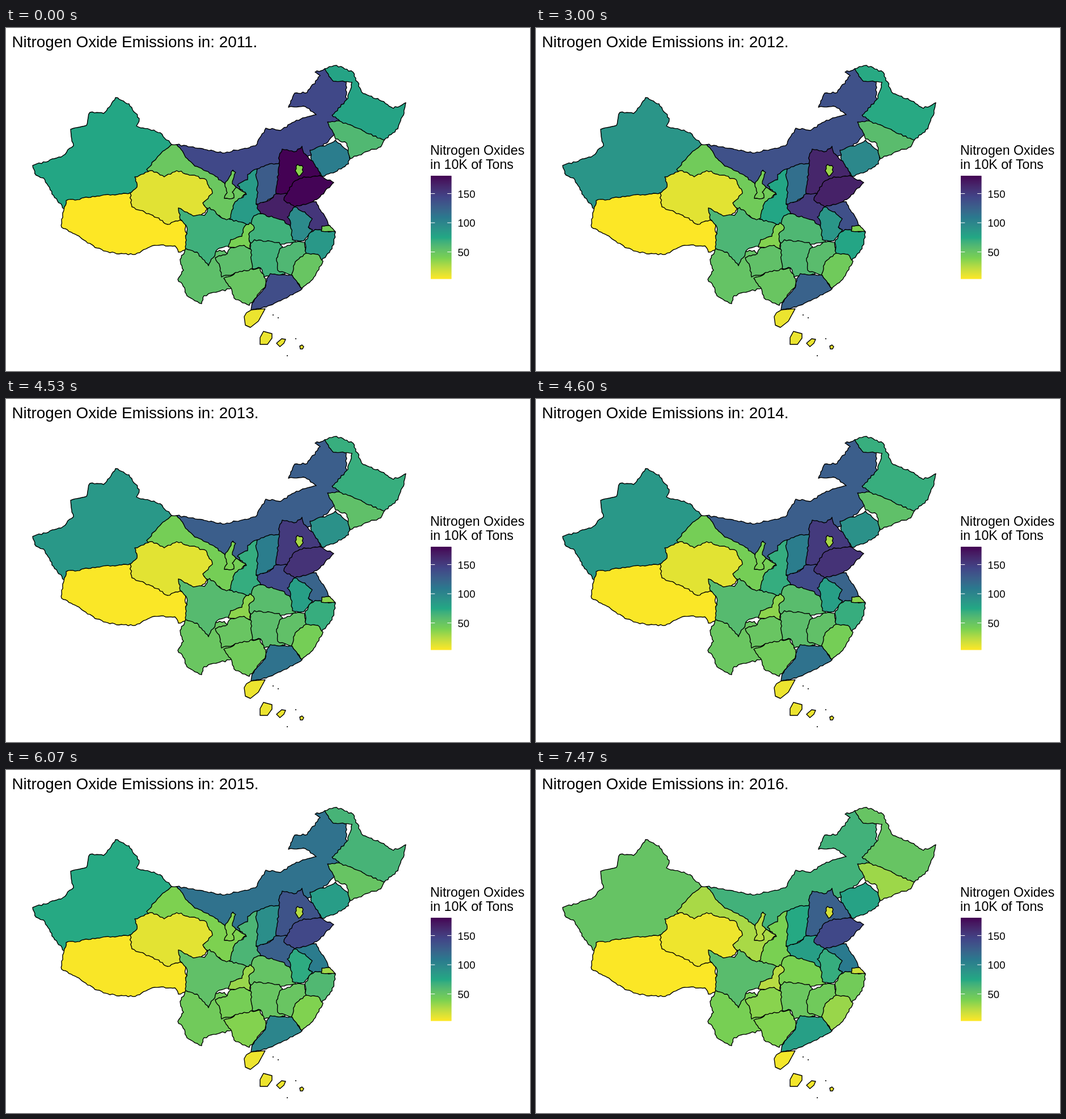
An HTML page with a canvas that plays this animation: 924 by 606 pixels, repeating every 8 s.

```html
<!DOCTYPE html>
<html lang="en">
<head>
<meta charset="utf-8">
<title>Nitrogen Oxide Emissions</title>
<style>
html, body { margin: 0; width: 100%; height: 100%; overflow: hidden; background: #fff; }
canvas { display: block; width: 924px; height: 606px; }
</style>
</head>
<body>
<canvas id="c" width="924" height="606"></canvas>
<script>
const ctx = document.getElementById('c').getContext('2d');
const LOOP = 8000, LOW = 4.1, HIGH = 180.11;
const FILL_AT = [1470, 3000, 4530, 6000, 7400];
const YEAR_AT = [1530, 3070, 4600, 6070, 7470];

// Colour scale, blended in Lab space
const lin = c => c <= .04045 ? c / 12.92 : ((c + .055) / 1.055) ** 2.4;
const gam = c => c <= .0031308 ? c * 12.92 : 1.055 * c ** (1 / 2.4) - .055;

function toLab(hex) {
  const [r, g, b] = [0, 2, 4].map(i => lin(parseInt(hex.substr(i, 2), 16) / 255));
  return [.4124 * r + .3576 * g + .1805 * b,
          .2126 * r + .7152 * g + .0722 * b,
          .0193 * r + .1192 * g + .9505 * b].map(Math.cbrt);
}

const stops = ['FDE725', '7AD151', '22A884', '2A788E', '414487', '440154'].map(toLab);

function color(value) {
  const p = Math.min(1, Math.max(0, (value - LOW) / (HIGH - LOW))) * 5;
  const i = Math.min(4, Math.floor(p));
  const [x, y, z] = stops[i].map((a, k) => (a + (stops[i + 1][k] - a) * (p - i)) ** 3);
  const rgb = [3.2406 * x - 1.5372 * y - .4986 * z,
               -.9689 * x + 1.8758 * y + .0415 * z,
               .0557 * x - .204 * y + 1.057 * z];
  return `rgb(${rgb.map(c => Math.round(255 * gam(Math.min(1, Math.max(0, c)))))})`;
}

// Regions overlap; later ones cover earlier ones
const regions = [];
let seed = 7;
const rand = () => (seed = seed * 16807 % 2147483647) / 2147483647;

function outline(text, rough) {
  const n = text.split(' ').map(Number), path = new Path2D();
  for (let i = 0; i < n.length; i += 2) {
    const x = n[i], y = n[i + 1];
    const dx = n[(i + 2) % n.length] - x, dy = n[(i + 3) % n.length] - y;
    const len = Math.hypot(dx, dy), parts = Math.max(1, Math.round(len / 4));
    for (let k = 0; k < parts; k++) {
      const off = k ? (rand() - .5) * rough / len : 0, t = k / parts;
      path.lineTo(x + dx * t - dy * off, y + dy * t + dx * off);
    }
  }
  path.closePath();
  return path;
}

// Emissions ease from 2011 to 2015, then drop to the 2016 value
function region(first, fifth, last, text, rough = 3, bulge = 0) {
  const mix = (share, hump) => first + (fifth - first) * share + bulge * hump;
  const values = [first, mix(.12, .5), mix(.36, 1), mix(.64, .85), fifth, last];
  regions.push({ path: outline(text, rough), fills: values.map(color) });
}

// North and west
region(142.2, 113.9, 66.5, '301 206 346 213 382 221 440 208 458 177 484 181 512 163 547 153 528 139 498 140 509 115 531 114 554 84 545 78 562 72 600 85 600 170 540 225 440 262 425 285 370 285 320 240', 3, 4);
region(75.6, 73.7, 51, '292 206 272 185 230 173 235 160 217 134 193 123 172 151 148 149 142 172 114 179 119 208 97 228 47 243 53 260 66 265 84 296 103 320 240 300 265 260', 3, 13.5);
region(4.1, 5.3, 4.6, '103 316 106 305 157 298 219 291 290 325 315 335 320 392 304 396 298 385 262 384 228 400 195 399 157 388 125 366 98 352 98 338');
region(48.1, 38.7, 28, '292 206 301 206 320 231 333 244 367 260 387 277 406 281 424 292 405 308 395 345 300 280 248 250 271 224');
region(12.4, 11.8, 8.5, '219 292 231 281 227 263 258 252 279 263 301 252 328 260 353 268 364 292 347 309 355 320 338 340 299 341 285 347 259 331 222 316');
region(45.8, 36.8, 24, '400 251 405 255 399 275 406 282 399 290 402 300 385 301 390 291 386 276');
region(54.9, 44.9, 41, '317 389 340 395 385 393 400 405 398 460 370 467 349 473 345 487 319 473 315 459 303 444 313 428 307 409');
region(67.5, 53.4, 57, '304 318 330 332 350 331 359 317 381 336 430 345 425 375 373 391 357 420 337 396 317 390 319 352 307 338');
region(83.6, 62.7, 40, '408 278 426 268 426 259 443 249 455 325 429 347 394 338 404 307 424 294');
region(128.6, 93.1, 74, '443 249 465 240 483 238 490 290 445 313 441 311 444 278 441 263');

// North-east
region(106.1, 82.8, 79, '536 216 566 206 581 198 607 220 604 240 577 256 557 262 538 232');
region(78.4, 64.5, 50, '562 72 583 66 612 78 627 113 662 129 683 142 705 132 702 150 691 178 667 198 600 180 583 160 575 154 603 124 610 96 577 94');
region(60.6, 50.2, 31, '567 166 583 164 607 171 640 187 667 198 661 210 637 218 607 231 601 204 581 196');
region(180.1, 135.1, 126, '482 226 487 214 512 218 522 209 525 221 541 235 557 262 505 300 476 292 480 255');
region(35.9, 24.7, 16, '514 241 522 243 524 254 516 262 510 252');
region(166.5, 126.2, 82, '441 311 465 304 476 293 493 292 520 300 505 352 449 328');
region(179, 142.4, 142, '525 263 557 262 578 273 548 303 535 311 509 316 490 304 497 289 507 272');

// Centre, east and south
region(67, 51.5, 40, '433 342 437 332 449 328 487 339 515 360 510 380 440 385 424 372');
region(40.3, 32.1, 24, '421 350 430 344 438 353 428 364 431 389 413 386 392 387 396 374 416 368');
region(153.6, 106.8, 108, '509 316 547 307 571 350 550 365 520 340');
region(95.9, 72.1, 70, '509 316 527 325 540 337 533 352 540 356 525 376 505 374 502 345 496 334');
region(85.9, 60.8, 44, '534 364 545 356 581 361 575 390 557 411 528 400 527 379');
region(43.6, 30.1, 19, '557 350 571 349 581 360 556 359', 1);
region(55.3, 41.9, 36, '369 406 390 399 394 390 420 384 440 395 440 425 380 440 377 421', 3, 3);
region(66.7, 49.7, 48, '431 381 438 374 482 379 495 395 492 435 455 440 449 424 434 425');
region(61.2, 49.3, 45, '511 378 527 379 529 397 525 425 502 438 479 428 477 407 483 390');
region(49.5, 37.9, 32, '529 398 550 400 559 412 541 444 522 460 503 437 510 413', 2);
region(49.4, 37.3, 38, '384 442 412 430 448 424 455 440 461 451 429 490 402 477 396 458', 3, 4);
region(138.8, 99.7, 81, '460 442 466 434 485 436 505 437 522 461 484 482 459 493 432 498 434 486 457 459', 2);

// Islands
for (const shape of ['420 510 424 503 433 498 457 496 445 518 431 529 422 525',
                     '448 547 454 536 469 540 469 548 461 559 448 559',
                     '477 557 486 549 493 550 490 557 483 563',
                     '518 562 522 560 525 563 523 567 519 567']) {
  region(9.5, 9, 6.9, shape, 0);
}

const current = (times, t) => times.filter(s => t >= s).length;

function label(text, x, y, size) {
  ctx.font = `${size}px "Liberation Sans", Arial, sans-serif`;
  ctx.fillStyle = '#000';
  ctx.fillText(text, x, y);
}

function dot(x, y) {
  ctx.beginPath();
  ctx.arc(x, y, 1.1, 0, 7);
  ctx.fill();
}

function legend() {
  const x = 749, top = 261.5, w = 36.5, h = 181.5;
  label('Nitrogen Oxides', 748, 224, 23.2);
  label('in 10K of Tons', 748, 249, 23.2);
  for (let i = 0; i < h; i++) {
    ctx.fillStyle = color(HIGH - (HIGH - LOW) * i / h);
    ctx.fillRect(x, top + i - .5, w, 1.5);
  }
  for (const v of [150, 100, 50]) {
    const y = top + (HIGH - v) / (HIGH - LOW) * h;
    ctx.fillStyle = '#fff';
    ctx.fillRect(x, y - .5, 7.3, 1);
    ctx.fillRect(x + w - 7.3, y - .5, 7.3, 1);
    label(v, 796.5, y + 7.3, 18.6);
  }
}

function draw() {
  const t = performance.now() % LOOP, step = current(FILL_AT, t);
  ctx.fillStyle = '#fff';
  ctx.fillRect(0, 0, 924, 606);
  label(`Nitrogen Oxide Emissions in: ${2011 + current(YEAR_AT, t)}.`, 10.5, 34, 27.85);
  ctx.lineWidth = 1.4;
  ctx.lineJoin = 'round';
  ctx.strokeStyle = '#000';
  for (const { path, fills } of regions) {
    ctx.fillStyle = fills[step];
    ctx.fill(path);
    ctx.stroke(path);
  }
  ctx.fillStyle = '#000';
  dot(471, 507);
  dot(480, 512);
  dot(511, 549);
  dot(496, 579);
  legend();
  requestAnimationFrame(draw);
}
draw();
</script>
</body>
</html>
```
